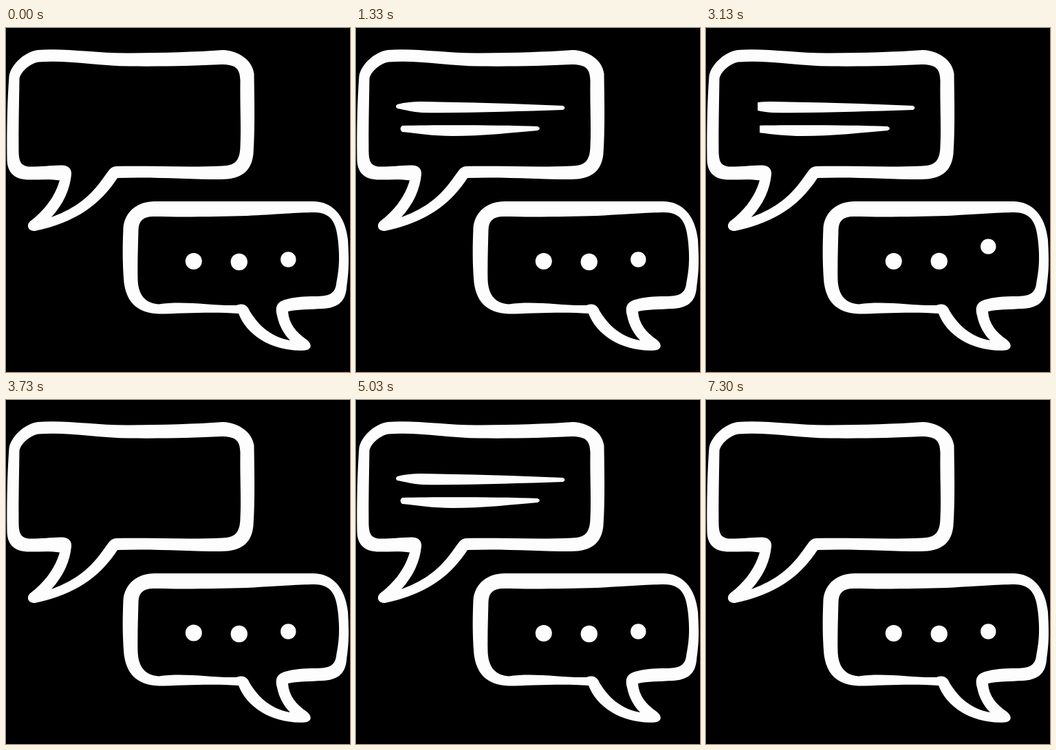
Animation of 500x500 px, one loop 7410 ms. Source, as an HTML page:

```html
<!DOCTYPE html>
<html lang="en">
<head>
<meta charset="utf-8">
<title>Chat bubbles</title>
<style>
html, body { margin: 0; height: 100%; overflow: hidden; background: #000; }
svg { display: block; width: 100vw; height: 100vh; fill: #fdfdfd; fill-rule: evenodd; }
</style>
</head>
<body>
<svg viewBox="0 0 500 500">
  <clipPath id="c0"><rect y="100" height="30"/></clipPath>
  <clipPath id="c1"><rect y="134" height="30"/></clipPath>

  <!-- left bubble: outer edge, then inner edge -->
  <path d="M46 32C88 29 130 37 180 36.5S275 35 315 32C340 33 358 48 360.5 66C361 105 362 145 359.5 183
    C357 208 342 220 312 220C265 220 215 216 162 218C138 255 102 283 42 295C32 295 29 287 35 281
    C55 266 71 246 78 221.5C62 219 45 221 30 220.5C10 219 1.5 208 1.5 190C1 145 2 105 4.5 70C7 54 26 35 46 32Z
    M47 49.5C88 46 132 55 180 55.5S275 55 313 53C334 53 340 59 340.5 76C340 115 342 145 340.5 172
    C340 193 333 200 314 200.5C265 203 210 200 160 201C151 202 150 207 145 213C123 245 103 261 66 275
    C84 255 93 234 95 213C96 203 88 199 80 199.5C62 200 48 202 33 201.5C22 200 19 195 18.5 180
    C18 145 19 110 19.5 74C21 64 34 52 47 49.5Z"/>

  <!-- right bubble -->
  <path d="M216 252C295 252 375 252 446 252C474 252 493 272 497 308C499 345 498 355 495 378
    C493 399 481 407 460 408C442 409 422 409 410 412C411 429 421 442 437 453C446 460 444 468 434 468.5
    C388 471 350 447 338 415C300 412 255 415 222 415.5C188 414 175 396 171.5 370C169 340 169.5 315 170.5 290
    C173 266 192 252 216 252Z
    M214 274C265 275 310 274 350 273C390 271 425 268 448 268C474 268 480 285 482.5 308C486 340 483 355 480 372
    C478 387 468 390 450 390C433 390 418 391 405 395C393 399 391 406 394 418C397 433 404 445 413 454
    C386 449 368 434 354 411C350 401 343 400 335 403C298 404 260 396 222 401.5C200 400 192 385 191.5 365
    C191 340 192 315 192.5 293C193 280 200 274 214 274Z"/>

  <path clip-path="url(#c0)" d="M60 111C72 108 82 107 96 107C160 108 235 110 301 113Q306 116 301 119
    C235 121 160 124 96 123C82 122 72 119 60 117Q56 114 60 111Z"/>
  <path clip-path="url(#c1)" d="M67 142C115 141 205 141 264 143Q270 146 264 149C228 152 185 157 140 157
    C112 157 88 153 67 151Q62 146 67 142Z"/>

  <circle class="dot" cx="272.8" cy="339" r="12"/>
  <circle class="dot" cx="338.8" cy="340" r="12.2"/>
  <circle class="dot" cx="410.3" cy="336.5" r="11.2"/>
</svg>
<script>
const LOOP = 7410, CYCLE = 3700, RUN = 1330, ERASE_AT = 2270;
const HOP = 716, LAG = 192, HEIGHT = 25;
const spans = [[57, 305], [63, 269]];
const masks = document.querySelectorAll('clipPath rect');
const dots = document.querySelectorAll('.dot');

const clamp = v => Math.max(0, Math.min(1, v));

// poses are held for 30 and 70 ms in turn
const hold = t => t - t % 100 + (t % 100 < 30 ? 0 : 30);

function draw(now) {
  const s = hold(now % LOOP) % CYCLE;

  // both lines are written, then wiped away, from left to right
  const head = clamp(s / RUN) ** 4.3;
  const tail = clamp((s - ERASE_AT) / RUN) ** 6;
  spans.forEach(([a, b], i) => {
    masks[i].setAttribute('x', a + (b - a) * tail);
    masks[i].setAttribute('width', (b - a) * (head - tail));
  });

  const start = s < ERASE_AT ? 0 : ERASE_AT;
  dots.forEach((dot, i) => {
    const p = clamp((s - start - i * LAG) / HOP);
    dot.setAttribute('transform', `translate(0 ${-HEIGHT * Math.sin(Math.PI * p) ** 2})`);
  });
}

const origin = performance.now();
function tick() {
  draw(performance.now() - origin);
  requestAnimationFrame(tick);
}
tick();
</script>
</body>
</html>
```
